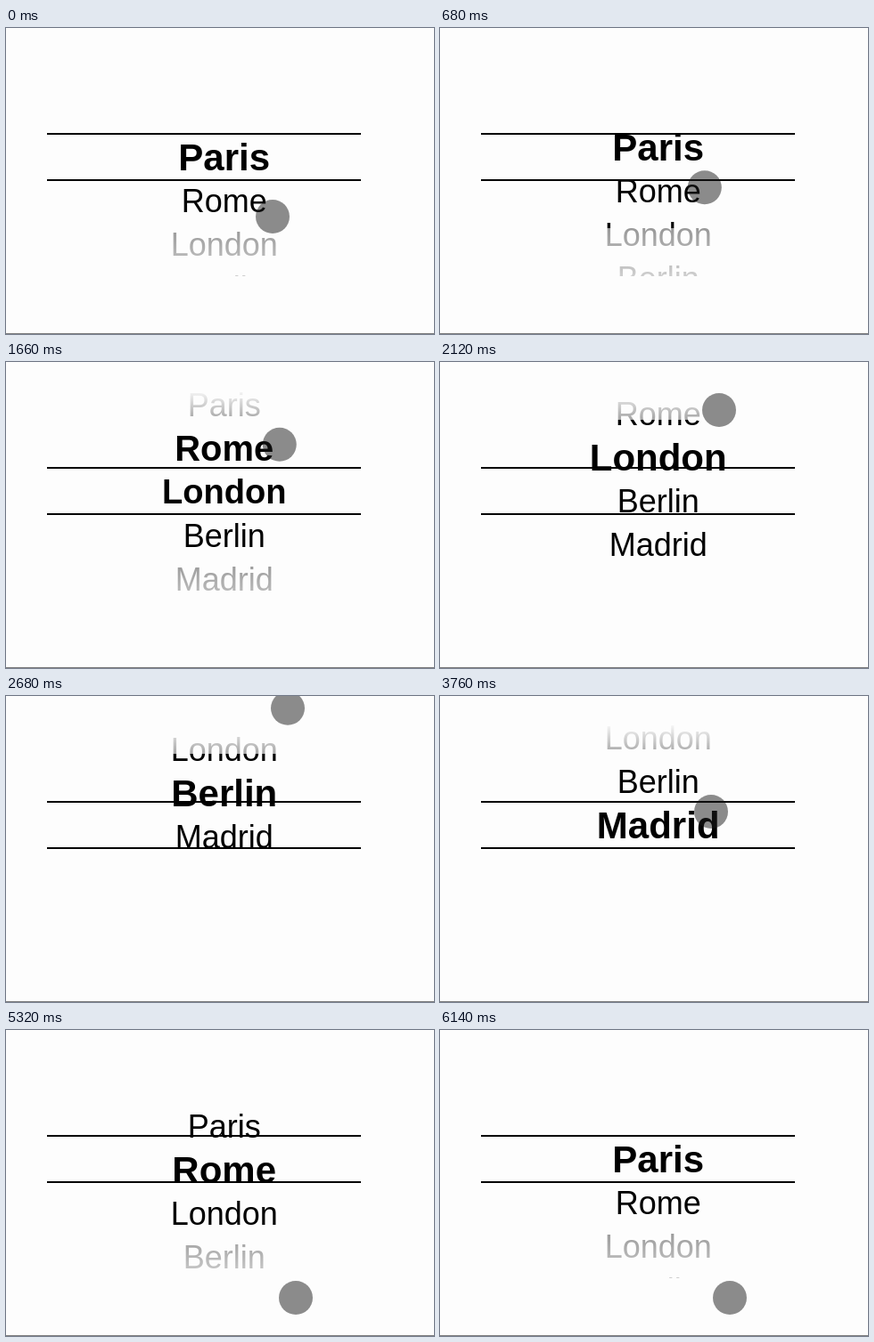
An HTML page with a canvas for the animation above (6180 ms loop, 480x344 px).

```html
<!DOCTYPE html>
<html lang="en">
<head>
<meta charset="utf-8">
<title>City picker</title>
<style>
html, body { margin: 0; width: 100%; height: 100%; overflow: hidden; background: #fdfdfd; }
canvas { display: block; }
</style>
</head>
<body>
<canvas id="stage" width="480" height="344"></canvas>
<script>
const ctx = document.getElementById('stage').getContext('2d');
const LOOP = 6180, LAST = 133;
const PAPER = '253,253,253';
const CITIES = ['Paris', 'Rome', 'London', 'Berlin', 'Madrid'];
const ROW = 49, MID_X = 244.7, MID_Y = 145;
const END = ROW * (CITIES.length - 1);
const BOX = { x: 47, y: 10, w: 350, h: 269, fade: 55 };

// ticks at which the first drag ends, the pointer turns, and the second drag ends
const RELEASE = 57, TURN = 66, DROP = 112;
const POINTER = [ // tick, x, y
  [1, 299, 212], [7, 295, 207], [10, 295, 207], [21, 299, 146], [24, 300, 135],
  [47, 313, 54], [RELEASE, 316, 14], [TURN, 316, 13], [81, 304, 130],
  [91, 306, 156], [98, 309, 184], [102, 311, 215], [DROP, 325, 301]
];

// the picture advances three ticks every 140 ms, unevenly spaced
function tickAt(ms) {
  const u = ms + 20, r = u % 140;
  return 3 * Math.floor(u / 140) + (r < 20 ? 0 : r < 40 ? 1 : 2);
}

function pointer(k) {
  const n = POINTER.findIndex(p => p[0] > k);
  const b = POINTER.at(n), a = n > 0 ? POINTER[n - 1] : b;
  const f = a === b ? 0 : (k - a[0]) / (b[0] - a[0]);
  return { x: a[1] + (b[1] - a[1]) * f, y: a[2] + (b[2] - a[2]) * f };
}

function settle(from, to, k, ticks) {
  const left = 1 - Math.min(1, k / ticks);
  return to + (from - to) * left * left;
}

// the list follows the pointer while dragged, then glides to the nearest end
function scroll(k) {
  const up = t => Math.max(0, 190 - pointer(t).y);
  const down = t => Math.min(END, 352 - pointer(t).y);
  if (k <= RELEASE) return up(k);
  if (k <= TURN) return settle(up(RELEASE), END, k - RELEASE, 10);
  if (k <= DROP) return down(k);
  return settle(down(DROP), 0, k - DROP, 20);
}

// a row is picked once it has come all the way to the middle
function picked(k, offset) {
  return k <= TURN ? Math.floor((offset + 3) / ROW) : Math.ceil((offset - 3) / ROW);
}

// walk through the loop once so rows can grow and shrink gradually
const states = [];
let bold = CITIES.map((_, i) => i ? 0 : 1);
for (let k = 0; k <= LAST; k++) {
  const offset = scroll(k), pick = picked(k, offset);
  bold = bold.map((b, i) => i === pick ? Math.min(1, b + 0.35) : Math.max(0, b - 0.35));
  states.push({ offset, bold, dot: pointer(k) });
}

function veil(y, clear, dense, from, to) {
  const g = ctx.createLinearGradient(0, clear, 0, dense);
  g.addColorStop(0, `rgba(${PAPER},${from})`);
  g.addColorStop(1, `rgba(${PAPER},${to})`);
  ctx.fillStyle = g;
  ctx.fillRect(BOX.x, y, BOX.w, BOX.fade);
}

function drawList({ offset, bold }) {
  ctx.save();
  ctx.beginPath();
  ctx.rect(BOX.x, BOX.y, BOX.w, BOX.h);
  ctx.clip();
  ctx.fillStyle = '#000';
  ctx.textAlign = 'center';
  CITIES.forEach((city, i) => {
    const size = 36 + 6 * bold[i];
    const weight = bold[i] > 1 / 3 ? 'bold' : 'normal';
    ctx.font = `${weight} ${size}px "Liberation Sans", Arial, sans-serif`;
    ctx.fillText(city, MID_X, MID_Y + i * ROW - offset + size * 0.36);
  });
  const inner = BOX.y + BOX.fade, low = 2 * MID_Y - inner;
  veil(BOX.y, inner, 30, 0.65, 1);
  veil(low, low, low + BOX.fade, 0.6, 0.82);
  ctx.restore();
}

function draw(state) {
  ctx.fillStyle = `rgb(${PAPER})`;
  ctx.fillRect(0, 0, 480, 344);
  drawList(state);
  ctx.fillStyle = '#000';
  ctx.fillRect(46, 118, 352, 2);
  ctx.fillRect(46, 170, 352, 2);
  ctx.fillStyle = '#808080';
  ctx.fillRect(0, 343, 480, 1);
  ctx.fillStyle = 'rgba(26,26,26,.5)';
  ctx.beginPath();
  ctx.arc(state.dot.x, state.dot.y, 19, 0, 2 * Math.PI);
  ctx.fill();
}

function loop() {
  draw(states[Math.min(LAST, tickAt(performance.now() % LOOP))]);
  requestAnimationFrame(loop);
}
loop();
</script>
</body>
</html>
```
